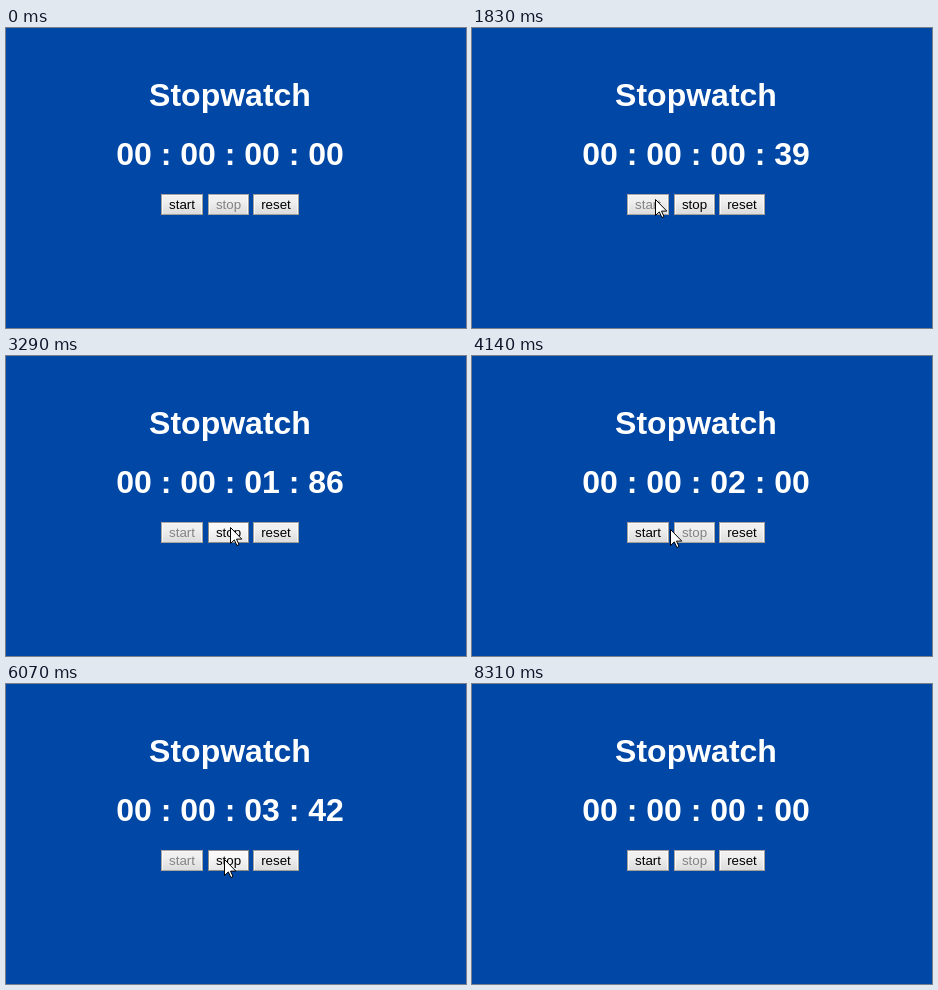
Write an HTML page that moves like this. It is 460 by 300 pixels and loops after 9.1 s.

```html
<!DOCTYPE html>
<html lang="en">
<head>
<meta charset="utf-8">
<title>Stopwatch</title>
<style>
  html, body { margin: 0; height: 100%; overflow: hidden; background: #0047a6; }
  svg { display: block; }
  text { font-family: Arial, "Liberation Sans", sans-serif; text-anchor: middle; white-space: pre; }
  .big { font-size: 32px; font-weight: bold; fill: #fff; }
  .button { font-size: 13.333px; fill: #000; }
  .button rect { fill: url(#face); stroke: #a3a099; }
  .button path { fill: none; stroke: #fff; stroke-opacity: .7; }
  .hover rect { fill: url(#lit); stroke: #8f8c86; }
  .pressed rect { fill: url(#down); stroke: #85827c; }
  .disabled text { fill: #838383; }
  .disabled rect { fill: url(#face); stroke: #a9a69f; }
</style>
</head>
<body>
<svg width="460" height="300" viewBox="0 0 460 300">
  <defs>
    <linearGradient id="face" x2="0" y2="1"><stop offset=".3" stop-color="#f0f0f0"/><stop offset="1" stop-color="#dcdcdc"/></linearGradient>
    <linearGradient id="lit" x2="0" y2="1"><stop offset=".3" stop-color="#f8f8f8"/><stop offset="1" stop-color="#e6e6e6"/></linearGradient>
    <linearGradient id="down" x2="0" y2="1"><stop offset=".3" stop-color="#e4e4e4"/><stop offset="1" stop-color="#d4d4d4"/></linearGradient>
  </defs>
  <text class="big" x="224" y="78">Stopwatch</text>
  <text class="big" id="clock" x="224" y="137"></text>
  <g id="buttons"></g>
  <path id="cursor" d="M.5 .5V16.5L4.3 12.9L6.9 18.5L9 17.6L6.5 12.1H11.8Z" fill="#fff" stroke="#000"/>
</svg>
<script>
const LOOP = 9100, START = 270, STEP = 77.3, RATE = 0.1004;
const $ = id => document.getElementById(id);

// Pointer stops: step, x, y
const path = [
  [0, 316, 288], [10, 183, 171], [21, 183, 171], [25, 188, 171], [32, 224, 171],
  [45, 224, 171], [54, 179, 174], [65, 179, 174], [73, 218, 175], [76, 218, 175],
  [80, 222, 175], [81, 222, 175], [85, 255, 174], [88, 258, 173], [99, 258, 173], [103, 361, 290]
];

const makeButton = (label, x, width) => {
  const node = document.createElementNS("http://www.w3.org/2000/svg", "g");
  node.innerHTML = `<rect x="${x + .5}" y="166.5" width="${width - 1}" height="20"/>
    <path d="M${x + 1.5} 186V167.5H${x + width - 1.5}V186"/>
    <text x="${x + width / 2}" y="181">${label}</text>`;
  $("buttons").append(node);
  return { node, x, width };
};
const start = makeButton("start", 155, 42);
const stop = makeButton("stop", 202, 41);
const reset = makeButton("reset", 247, 46);

const within = (k, from, to) => k >= from && k < to;

function pointerAt(k) {
  const i = path.findIndex(p => p[0] >= k);
  if (i < 1) return path[i < 0 ? path.length - 1 : 0].slice(1);
  const [k0, x0, y0] = path[i - 1], [k1, x1, y1] = path[i];
  const u = (k - k0) / (k1 - k0), e = i === path.length - 1 ? u : u * u * (3 - 2 * u);
  return [x0 + (x1 - x0) * e, y0 + (y1 - y0) * e].map(Math.round);
}

function hundredths(k) {
  const time = START + k * STEP;
  if (k < 15 || k >= 94) return 0;
  if (k < 41) return (time - 1424.6) * RATE;
  if (k < 57) return 200;
  if (k < 80) return 225.8 + (time - 4908) * RATE;
  return 378;
}

function styleButton(button, enabled, pressed, pointer) {
  const hover = pointer && within(pointer[0], button.x, button.x + button.width) &&
    within(pointer[1], 166, 187);
  const state = !enabled ? "disabled" : pressed ? "pressed" : hover ? "hover" : "";
  button.node.setAttribute("class", "button " + state);
}

function draw() {
  const t = performance.now() % LOOP;
  const k = t < START ? -1 : Math.floor((t - START) / STEP + .2);
  const running = within(k, 15, 41) || within(k, 57, 80);
  const pointer = within(k, 0, 104) ? pointerAt(k) : null;

  const n = Math.floor(hundredths(k));
  $("clock").textContent = [0, 0, Math.floor(n / 100), n % 100]
    .map(v => String(v).padStart(2, "0")).join(" : ");

  styleButton(start, !running, k === 14, pointer);
  styleButton(stop, running, k === 40 || k === 79, pointer);
  styleButton(reset, true, within(k, 92, 94), pointer);

  $("cursor").style.display = pointer ? "" : "none";
  if (pointer) $("cursor").setAttribute("transform", `translate(${pointer})`);
  requestAnimationFrame(draw);
}
draw();
</script>
</body>
</html>
```
